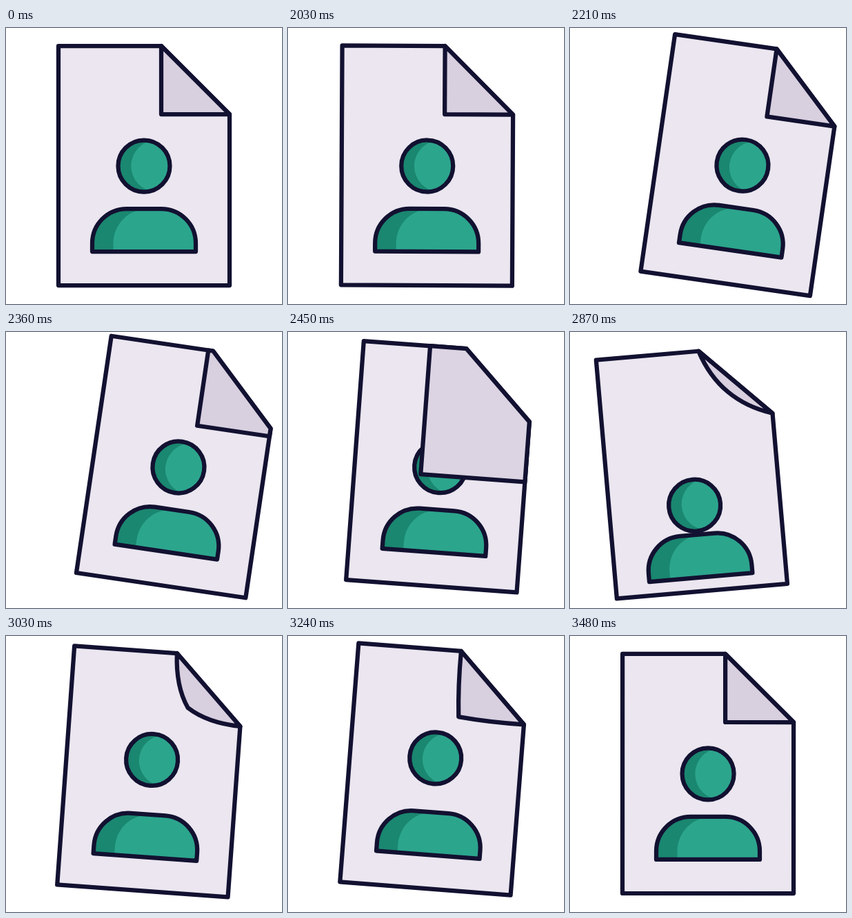
Recreate the animation shown at these times as an HTML page with a canvas. Size 400 px wide and 400 px high, loop 3510 ms.

```html
<!DOCTYPE html>
<html lang="en">
<head>
<meta charset="utf-8">
<title>Profile document</title>
<style>
  html, body { margin: 0; width: 100%; height: 100%; overflow: hidden; background: #fff; }
  canvas { display: block; width: 400px; height: 400px; }
</style>
</head>
<body>
<canvas id="stage"></canvas>
<script>
const LOOP = 3510, STEP = 30, BEGIN = 2030, SWAP = 2671;
const INK = '#121131', PAPER = [235, 230, 239], FOLD = [216, 207, 223];
const GREEN = '#2ca58d', SHADE = '#1a8770';

const canvas = document.getElementById('stage');
const ctx = canvas.getContext('2d');
const ratio = window.devicePixelRatio || 1;
canvas.width = canvas.height = 400 * ratio;

const clamp = x => Math.min(1, Math.max(0, x));
const ease = u => u * u * u * (u * (6 * u - 15) + 10);
const progress = (from, to, t) => ease(clamp((t - from) / (to - from)));
const mix = (a, b, k) => `rgb(${a.map((v, i) => Math.round(v + (b[i] - v) * k))})`;

// Eases through [time, value] poses.
const track = (...poses) => t => poses.slice(1).reduce((value, [time, next], i) =>
  value + (next - poses[i][1]) * progress(poses[i][0], time, t), poses[0][1]);

const tilt = track([1982, 0], [2283, 9.1], [2730, -8.7], [3110, 5.4], [3500, 0]);
const shiftX = track([1982, 0], [2283, 55.3], [2670, -37.5], [2730, -37.5], [3110, 15.1], [3500, 0]);
const shiftY = track([2100, 0], [2430, -4.3], [2720, 3.3], [2850, 3.3], [3150, -7.1], [3500, 0]);
const headDrop = track([2600, 215], [3035, -17.5], [3165, -17.5], [3500, 0]);
const bodyDrop = track([2600, 130], [3010, 0]);

function polygon(...points) {
  const path = new Path2D();
  points.forEach(([x, y]) => path.lineTo(x, y));
  path.closePath();
  return path;
}

const page = polygon([76, 26], [225, 26], [324, 125], [324, 373], [76, 373]);

const head = new Path2D();
head.arc(200, 200, 37.5, 0, 2 * Math.PI);

const body = new Path2D();
body.moveTo(125, 324);
body.arc(175, 312, 50, Math.PI, 1.5 * Math.PI);
body.arc(225, 312, 50, 1.5 * Math.PI, 2 * Math.PI);
body.lineTo(275, 324);
body.closePath();

function paint(path, fill) {
  ctx.fillStyle = fill;
  ctx.fill(path);
  ctx.stroke(path);
}

// Dark shape with its own lighter copy shifted right inside it.
function paintShaded(path, drop, lightShift) {
  ctx.save();
  ctx.translate(0, drop);
  ctx.fillStyle = SHADE;
  ctx.fill(path);
  ctx.save();
  ctx.clip(path);
  ctx.translate(lightShift, 0);
  ctx.fillStyle = GREEN;
  ctx.fill(path);
  ctx.restore();
  ctx.stroke(path);
  ctx.restore();
}

// The folded corner sweeping over the whole sheet.
function sweepingFlap(grown) {
  const x = 225 - 149 * grown, y = 125 + 248 * grown;
  return polygon([225, 26], [x, 26], [x, y], [324, y], [324, 125]);
}

// The corner bending inwards from the diagonal edge.
function bendingFlap(open) {
  const along = 24.75, bulge = 2 * along * open;
  const bend = bulge * (1 - .5 * clamp(1.5 * open - .5));
  const path = new Path2D();
  path.moveTo(225, 26);
  path.quadraticCurveTo(225 + along - bend, 26 + along + bend, 274.5 - bulge, 75.5 + bulge);
  path.quadraticCurveTo(324 - along - bend, 125 - along + bend, 324, 125);
  path.closePath();
  return path;
}

function draw(t) {
  const fresh = t >= SWAP;
  ctx.setTransform(ratio, 0, 0, ratio, 0, 0);
  ctx.clearRect(0, 0, 400, 400);
  ctx.translate(200 + shiftX(t), 199.5 + shiftY(t));
  ctx.rotate(tilt(t) * Math.PI / 180);
  ctx.translate(-200, -199.5);
  ctx.strokeStyle = INK;
  ctx.lineWidth = 6.25;
  ctx.lineJoin = 'round';

  ctx.fillStyle = `rgb(${PAPER})`;
  ctx.fill(page);
  ctx.save();
  ctx.clip(page);
  paintShaded(head, fresh ? headDrop(t) : 0, 18.7);
  paintShaded(body, fresh ? bodyDrop(t) : 0, 30.5);
  ctx.restore();
  ctx.stroke(page);

  if (fresh) {
    paint(bendingFlap(progress(2556, 3422, t)), `rgb(${FOLD})`);
  } else {
    const grown = progress(2290, SWAP, t);
    paint(sweepingFlap(grown), mix(FOLD, PAPER, grown ** 1.5));
  }
}

const start = performance.now();
function tick() {
  const t = (performance.now() - start) % LOOP;
  const held = BEGIN + Math.floor((t - BEGIN) / STEP) * STEP;
  draw(held < BEGIN ? 0 : held);
  requestAnimationFrame(tick);
}
tick();
</script>
</body>
</html>
```
